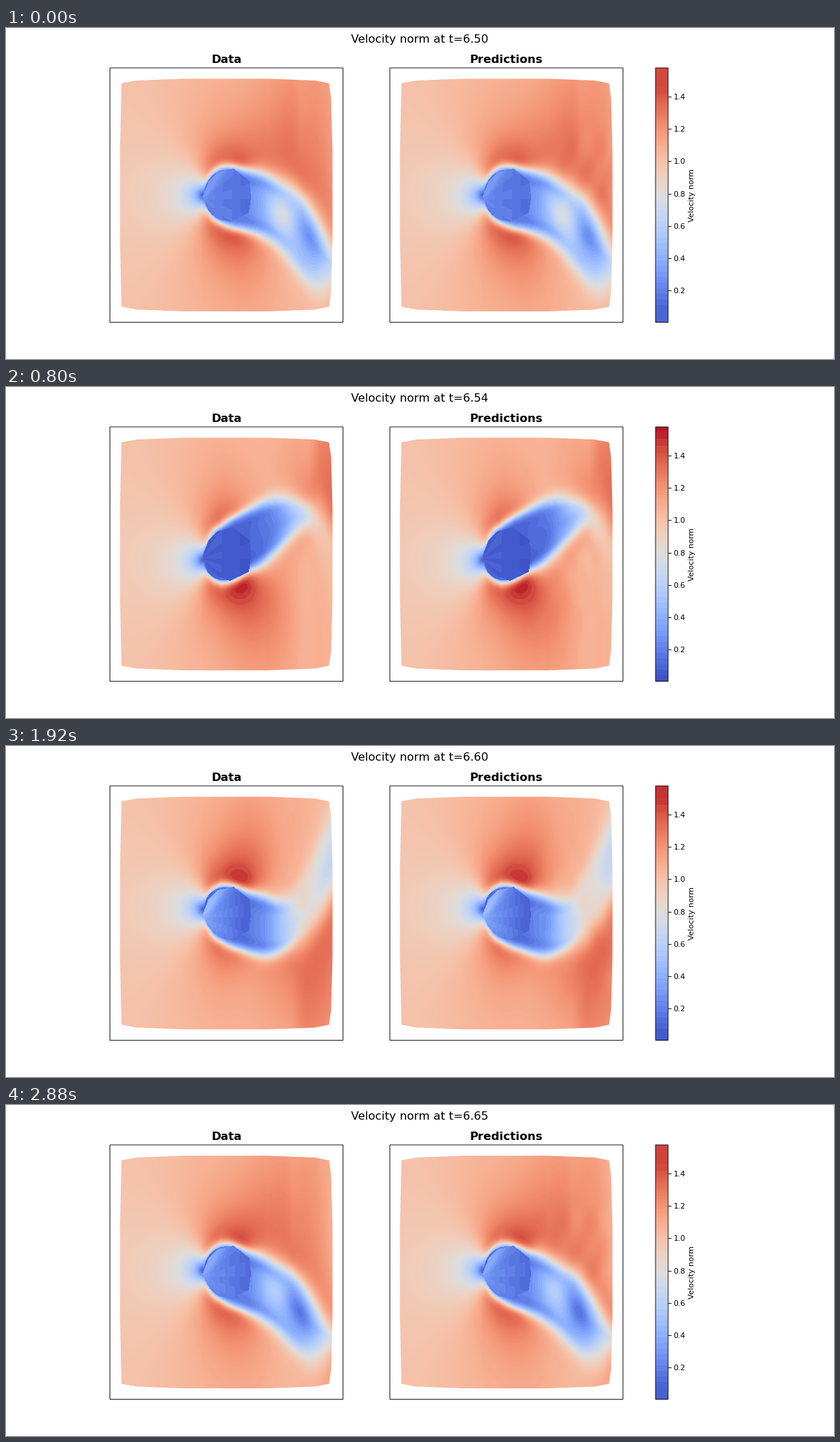
A matplotlib script for the animation above (3040 ms loop, 1183x473 px).

```python
import numpy as np
import matplotlib as mpl
import matplotlib.pyplot as plt
from matplotlib.animation import FuncAnimation
from matplotlib.patches import Rectangle
from matplotlib.path import Path

W, H, DPI = 1183, 473, 64
FRAMES, HALF = 19, 9.5          # one shedding period, and half of it
VMAX, MID = 1.58, 239           # top of the scale, wake axis in pixels
SHIFT = 400                     # from left panel to right panel
CMAP = mpl.colormaps["coolwarm"]
plt.rcParams["font.family"] = "DejaVu Sans"

X0, X1, Y0, Y1 = 162, 468, 71, 407
X, Y = np.meshgrid(np.arange(X0, X1) + 0.5, np.arange(Y0, Y1) + 0.5)
COLS = X[0]

BODY = [(281, 241), (289, 220), (303, 206), (325, 201), (348, 219),
        (350, 242), (347, 264), (320, 277), (303, 271), (289, 259)]
INSIDE = Path(BODY).contains_points(
    np.column_stack([X.ravel(), Y.ravel()])).reshape(X.shape)

RIM = [(162.8, 175), (165, 79), (187, 75), (252, 72.5), (375, 72.5),
       (441, 75), (461.5, 79), (464.5, 100), (466.5, 175)]
OUTLINE = RIM + [(x, 2 * MID - 0.6 - y) for x, y in reversed(RIM)]

rng = np.random.default_rng(4)
RIPPLES = [(2 * np.pi * rng.integers(2, 8) / (14 * FRAMES),
            rng.uniform(-0.1, 0.1), rng.uniform(0, 2 * np.pi))
           for _ in range(7)]


def pt(px):
    return px * 72 / DPI


def sigmoid(a):
    return 1 / (1 + np.exp(-np.clip(a, -40, 40)))


def wave(s, delay, period):
    return np.cos(2 * np.pi * (s - delay) / period)


def free_stream(s):
    """Potential flow round the cylinder, its peaks softened."""
    swing = np.sin(2 * np.pi * s / FRAMES)
    px = (X - 316) / 34.5
    py = (MID - Y) / 38.5
    py = py + 0.26 * swing * sigmoid(-4 * (px + 0.7))
    z = px + 1j * py
    r = np.abs(z)
    z = np.where(r < 0.95, 0.95, z)
    v = np.abs(1 - 1 / z ** 2)
    v = np.where(v > 1, 1 + 0.36 * np.tanh((v - 1) / 0.36), v)
    v = v * (1 - np.exp(-(np.maximum(r, 0.96) - 0.9) / 0.1))
    return v - 0.06 * swing * py / np.maximum(r, 1) ** 2 * sigmoid(4 * px)


def wake_shape(s):
    """Centre line (up is positive), half width and core speed along x."""
    d = np.maximum(COLS - 306, 0)
    late = np.maximum(COLS - 345, 0) / 121
    bend = np.tanh(1.1 * wave(s, 5.7 + 3.9 * late ** 2, FRAMES))
    centre = (0.45 * d + 0.001 * d ** 2) * bend / np.tanh(1.1)

    nose = np.clip((330 - COLS) / 50, 0, 1)
    late = np.maximum(COLS - 375, 0) / 91
    pulse = wave(s, -0.7 + 3.7 * late ** 2, HALF)
    width = (44 * np.sqrt(1 - nose ** 2)
             - 0.11 * np.maximum(COLS - 370, 0)
             + 22 * sigmoid((COLS - 400) / 14) * pulse)

    d = np.maximum(COLS - 345, 0)
    delay = 0.058 * np.maximum(COLS - 370, 0)
    speed = 0.17 + 0.0047 * d + (0.08 + 0.0015 * d) * wave(s, delay, HALF)
    return centre, width, speed


def jet(s):
    """Speed-up beside the wake, drifting downstream."""
    delay = 5 + 0.065 * (COLS - 350)
    return 0.25 + 0.25 * wave(s, delay, FRAMES)


def spot(side, x, off, long, short):
    dx, dv = X - x, side * (MID - Y) - off
    a, b = 0.42 * dx + 0.9 * dv, 0.9 * dx - 0.42 * dv
    return np.exp(-(a / long) ** 2 / 2 - (b / short) ** 2 / 2)


def body(s):
    swing = np.sin(2 * np.pi * s / FRAMES)
    left = 0.2 - 0.14 * swing
    right = 0.08 + 0.05 * wave(s, 0, HALF)
    v = left + (right - left) * np.clip((X - 290) / 52, 0, 1)
    fan = np.arctan2(Y - 245, X - 279)
    v = v + 0.02 * (np.floor(fan / 0.32) % 2)
    edge = ((X - 283) * 30 + (Y - 235) * 22) / 37
    return v + 0.1 * (1 - swing) * np.exp(-(edge / 8) ** 2)


def velocity(s):
    c, h, core = wake_shape(s)
    u = Y - (MID - c)
    slope = np.abs(np.gradient(c)) + np.abs(np.gradient(h))
    gap = (np.abs(u) - h) / np.sqrt(1 + np.minimum(slope, 2) ** 2)

    # fast fluid outside the wake
    upper = sigmoid(-u / 12)
    push = jet(s + HALF) * upper + jet(s) * (1 - upper)
    outer = (free_stream(s) + 0.04 * sigmoid((X - 270) / 25)
             + push * sigmoid((X - 335) / 18)
             * np.exp(-np.maximum(gap, 0) / 80))

    # slow fluid inside, with shear layers and drifting cores
    ring = np.exp(-((np.abs(u) / np.maximum(h, 8) - 0.68) / 0.2) ** 2)
    inner = core * (1 - 0.35 * ring * sigmoid((395 - X) / 12))
    for side, age in ((1, s % FRAMES), (-1, (s + HALF) % FRAMES)):
        x = 398 + 14.5 * (age - 7)
        off = 25 + 35 * np.tanh((x - 375) / 30)
        dark = 0.6 * np.exp(-((age - 8) / 2.6) ** 2)
        inner = inner * (1 - dark * spot(side, x, off, 22, 9))
        x = 368 + 10.5 * (age - 7)
        off = 28 - 0.9 * (age - 9) ** 2
        pale = 0.28 * np.exp(-((age - 10) / 2.2) ** 2)
        inner = inner + pale * spot(side, x, off, 18, 11)

    soft = 3.5 + 0.033 * np.maximum(X - 330, 0)
    mask = sigmoid(-gap / soft) * sigmoid((X - 290) / 4)
    v = outer * (1 - mask) + inner * mask
    return np.where(INSIDE, body(s), v)


def ripple(s):
    waves = sum(np.sin(kx * (X - 14 * s) + ky * Y + ph)
                for kx, ky, ph in RIPPLES) / np.sqrt(len(RIPPLES))
    v = (0.03 * waves * sigmoid((X - 375) / 18)
         * np.exp(-((Y - MID) / 95) ** 2))
    return np.where(INSIDE, 0, v)


LEVELS = np.concatenate([np.arange(0, 0.7, 0.035),
                         np.arange(0.7, 1.42, 0.006),
                         np.arange(1.42, 1.6, 0.045)])
SHADES = np.append((LEVELS[1:] + LEVELS[:-1]) / 2, VMAX)


def paint(v, s):
    beat = wave(s, 0, HALF)
    i = np.clip(np.searchsorted(LEVELS, v, side="right") - 1,
                0, len(SHADES) - 1)
    shade = np.clip(SHADES[i], 0.06 + 0.03 * beat, 1.5 - 0.05 * beat)
    return CMAP(shade / VMAX)[..., :3]


fig = plt.figure(figsize=(W / DPI, H / DPI), dpi=DPI, facecolor="white")
ax = fig.add_axes([0, 0, 1, 1])
ax.axis("off")


def picture(x0, x1, y0, y1):
    return ax.imshow(np.ones((2, 2, 3)), extent=(x0, x1, y1, y0),
                     origin="upper", aspect="auto", interpolation="nearest")


def frame(x0, x1):
    ax.add_patch(Rectangle((x0, 57), x1 - x0, 363.5, fill=False, ec="black",
                           lw=pt(0.876), zorder=3, snap=False))


panels = [picture(X0 + dx, X1 + dx, Y0, Y1) for dx in (0, SHIFT)]
bar = picture(928, 946, 57, 421)
ax.set_xlim(0, W)
ax.set_ylim(H, 0)
for im, dx in zip(panels, (0, SHIFT)):
    im.set_clip_path(Path([(x + dx, y) for x, y in OUTLINE]), ax.transData)
    frame(148.5 + dx, 481.5 + dx)
frame(928, 946)

for name, x in (("Data", 314.8), ("Predictions", 714.8)):
    ax.text(x, 50.2, name, size=pt(16.43), weight="bold",
            ha="center", va="baseline")
for k in range(1, 8):
    y = 420.97 - 0.2 * k * 364.2 / VMAX
    ax.plot([946, 949.8], [y, y], color="black", lw=pt(0.876))
    ax.text(953.4, y, f"{0.2 * k:.1f}", size=pt(10.95),
            ha="left", va="center_baseline")
ax.text(980, MID, "Velocity norm", size=pt(10.95), rotation=90,
        ha="center", va="center")
title = ax.text(591.5, 9.46, "", size=pt(16.43), ha="center", va="top")

SCALE = np.linspace(VMAX, 0, 364)[:, None]


def update(i):
    v = velocity(i)
    panels[0].set_data(paint(v, i))
    panels[1].set_data(paint(v + ripple(i), i))
    bar.set_data(paint(SCALE, i))
    title.set_text(f"Velocity norm at t={6.5005 + 0.0085 * i:.2f}")
    return [*panels, bar, title]


anim = FuncAnimation(fig, update, frames=FRAMES, interval=160,
                     repeat=True, blit=False)
plt.show()
```
